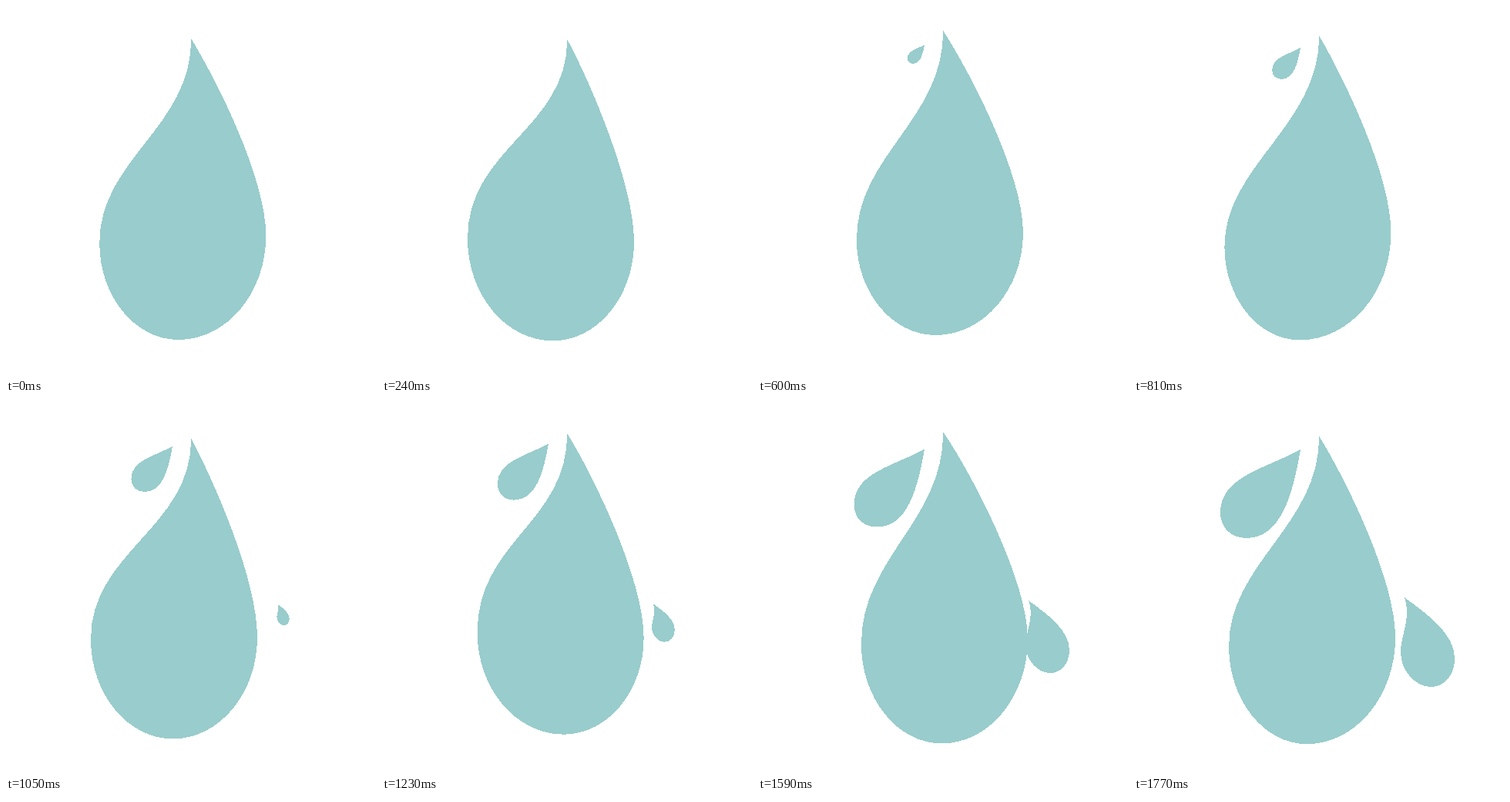
Write an HTML page that moves like this. It is 480 by 480 pixels and loops after 1.8 s.

```html
<!DOCTYPE html>
<html lang="en">
<head>
<meta charset="utf-8">
<title>Water drops</title>
<style>
  html, body { margin: 0; height: 100%; overflow: hidden; background: #fff; }
  svg { display: block; width: 100%; height: 100%; fill: #9cc; shape-rendering: crispEdges; }
</style>
</head>
<body>
<svg viewBox="0 0 480 480">
  <path id="body"/>
  <path id="left" d="M0 0C-45 25-104 35-104 82C-104 102-90 115-70 115C-25 115-10 58 0 0Z"/>
  <path id="right" d="M0 0C9 28-5 48-5 71C-5 95 14 116 34 116C52 116 65 101 65 79C65 47 30 22 0 0Z"/>
</svg>
<script>
const LOOP = 1800, STEP = 30, TIP_X = 240.3, HALF_WIDTH = 108, REST = 433, ROUND = 0.55;
const [body, left, right] = ['body', 'left', 'right'].map(id => document.getElementById(id));

// Each wobble swings between its turning points: [time, value]
const sway = [[-290, 246.5], [215, 218.5], [465, 238.5], [1050, 218], [1420, 246.5], [2020, 222]];
const lean = [[0, -5.5], [300, 3.5], [810, -10.5], [1220, 4], [1820, -7]];
const tip = [[-60, 42], [180, 44], [570, 32], [1040, 45], [1410, 32], [1800, 42]];
const base = [[0, 433], [110, 439], [300, 433], [600, 427], [930, 436], [1390, 426], [1700, 446], [1860, 434]];

function swing(turns, t) {
  const i = turns.findIndex(turn => turn[0] > t);
  const [t0, a] = turns[i - 1], [t1, b] = turns[i];
  return a + (b - a) * (1 - Math.cos(Math.PI * (t - t0) / (t1 - t0))) / 2;
}

function bodyPath(x, tilt, top, bottom) {
  const mix = (a, b) => a + (b - a) * ROUND;
  const middle = 303 + 0.7 * (bottom - REST);
  const lx = x - HALF_WIDTH, ly = middle - 0.85 * tilt;
  const rx = x + HALF_WIDTH, ry = middle + 0.85 * tilt;
  const bx = x + tilt;
  return `M${TIP_X} ${top}
    C${TIP_X} ${top + 116} ${lx} ${ly - 115 - tilt} ${lx} ${ly}
    C${lx} ${mix(ly, bottom)} ${mix(bx, lx)} ${bottom} ${bx} ${bottom}
    C${mix(bx, rx)} ${bottom} ${rx} ${mix(ry, bottom)} ${rx} ${ry}
    C${rx} ${ry - 75} ${TIP_X + 0.355 * (rx - TIP_X)} ${top + 57} ${TIP_X} ${top}Z`;
}

function place(drop, x, y, size) {
  drop.setAttribute('visibility', size > 0 ? 'visible' : 'hidden');
  drop.setAttribute('transform', `translate(${x} ${y}) scale(${Math.max(size, 0)})`);
}

function draw(now) {
  const t = Math.floor(now % LOOP / STEP) * STEP;
  const bottom = swing(base, t);
  body.setAttribute('d', bodyPath(swing(sway, t), swing(lean, t), swing(tip, t), bottom));

  const leftSize = (t - 285) / 1485, rightSize = (t - 830) / 940;
  place(left, 216, 54 + 0.6 * (bottom - REST), leftSize);
  place(right, 353 - 2 * rightSize, 260 - 9 * rightSize ** 3, rightSize);
}

let start;
function tick(now) {
  start ??= now;
  draw(now - start);
  requestAnimationFrame(tick);
}
draw(0);
requestAnimationFrame(tick);
</script>
</body>
</html>
```
